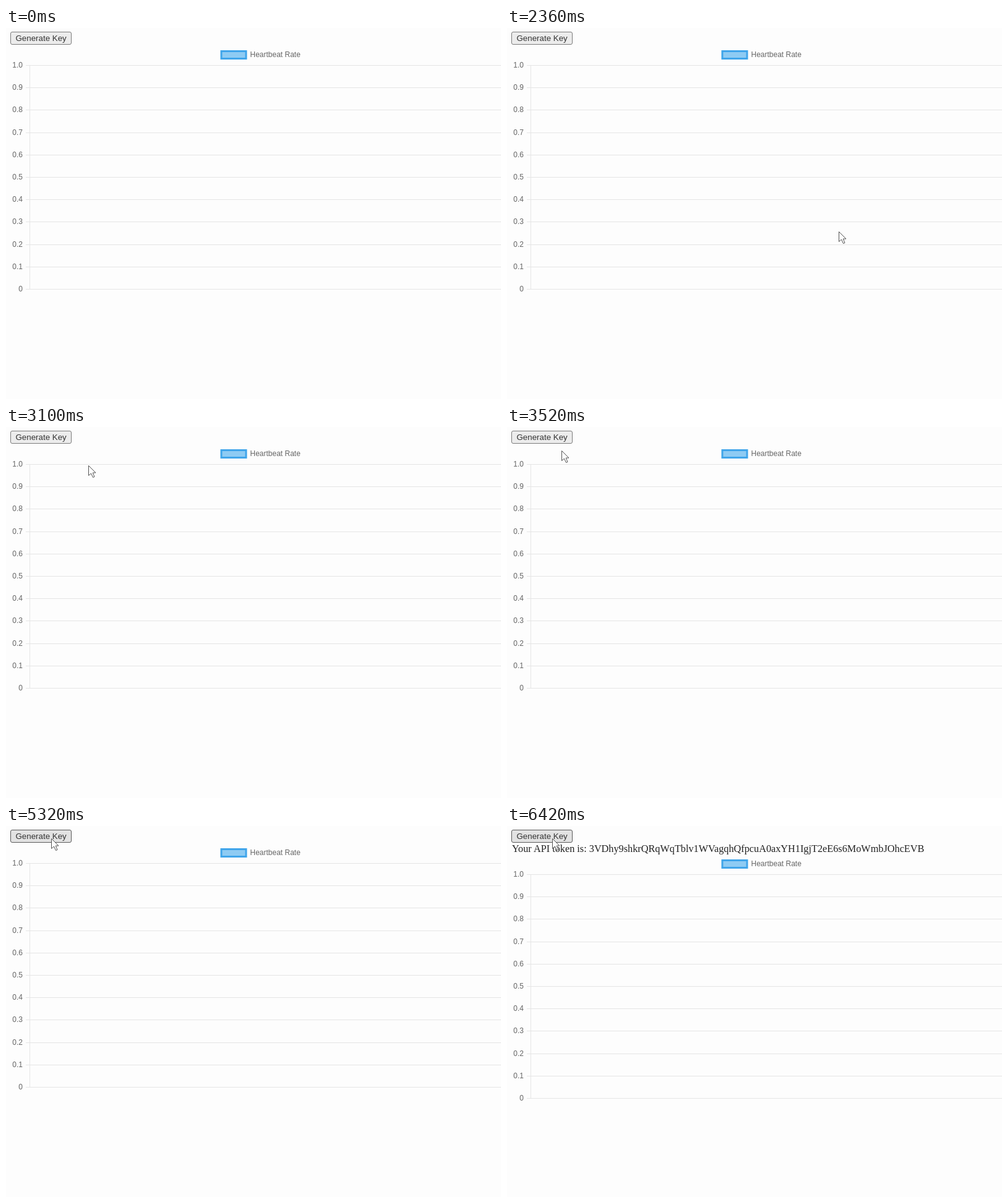
Recreate the animation shown at these times as an HTML page. Size 800 px wide and 600 px high, loop 8 s.

```html
<!DOCTYPE html>
<html lang="en">
<head>
<meta charset="utf-8">
<title>Heartbeat chart</title>
<style>
  html, body { margin: 0; width: 100%; height: 100%; overflow: hidden; background: #fdfdfd; }
  svg { display: block; width: 800px; height: 600px; }
  text { font: 12px "Liberation Sans", Arial, sans-serif; fill: #666; }
  #button text { font-size: 13.333px; fill: #333; }
  #token { font: 16.25px "Liberation Serif", Times, serif; fill: #222; }
  #grid path { fill: none; stroke: #e5e5e5; }
</style>
</head>
<body>
<svg viewBox="0 0 800 600">
  <g id="button">
    <rect id="face" x="7.5" y="6.5" width="98" height="20" rx="2.5"/>
    <text x="15.5" y="21">Generate Key</text>
  </g>
  <text id="token" x="8" y="42">Your API token is: 3VDhy9shkrQRqWqTblv1WVagqhQfpcuA0axYH1IgjT2eE6s6MoWmbJOhcEVB</text>
  <g id="chart">
    <rect x="348" y="37.5" width="40" height="12" fill="#8ecbf3" stroke="#40a5ea" stroke-width="3"/>
    <text x="394.5" y="46.5">Heartbeat Rate</text>
    <g id="grid"><path d="M38.5 60V422"/></g>
  </g>
  <path id="cursor" d="M0 0V16L4 12.5L7 19L9.5 18L6.8 11.5H11.5Z" fill="#fdfdfd" stroke="#555"/>
</svg>
<script>
const LOOP = 8000, STEP = 40;
const CURSOR_IN = 1940, PRESS = 5620, RELEASE = 5860, TOKEN_SHOWN = 6180;
const linear = p => p;
const easeOut = p => 1 - (1 - p) ** 2;
const moves = [
  { start: 1940, end: 2680, from: [789, 496], to: [321, 187], ease: linear },
  { start: 2780, end: 3520, from: [228, 112], to: [88, 38], ease: easeOut },
  { start: 3660, end: 4080, from: [88, 38], to: [73, 20], ease: linear }
];
const faces = {
  idle: ["#ececec", "#7c7c7c"],
  hover: ["#e2e2e2", "#5a5a5a"],
  pressed: ["#f5f5f5", "#8d8d8d"]
};
const byId = id => document.getElementById(id);
const [face, token, chart, grid, cursor] =
  ["face", "token", "chart", "grid", "cursor"].map(byId);

function add(parent, tag, attributes, content = "") {
  const node = document.createElementNS(parent.namespaceURI, tag);
  for (const name in attributes) node.setAttribute(name, attributes[name]);
  node.textContent = content;
  parent.append(node);
}

for (let i = 0; i <= 10; i++) {
  const y = Math.round(60 + i * 36.2);
  add(grid, "path", { d: `M32 ${y + 0.5}H800` });
  add(grid, "text", { x: 27, y: y + 3.5, "text-anchor": "end" },
    i === 10 ? "0" : (1 - i / 10).toFixed(1));
}

function cursorAt(time) {
  const move = moves.findLast(m => time >= m.start) || moves[0];
  const elapsed = Math.floor((time - move.start) / STEP) * STEP;
  const done = time >= move.end ? 1 : Math.max(0, elapsed / (move.end - move.start));
  return move.from.map((a, i) => Math.round(a + (move.to[i] - a) * move.ease(done)));
}

function draw(time) {
  const [x, y] = cursorAt(time);
  const hovering = x > 7 && x < 106 && y > 6 && y < 27;
  const state = time >= PRESS && time < RELEASE ? "pressed" : hovering ? "hover" : "idle";
  const [fill, stroke] = faces[state];
  face.setAttribute("fill", fill);
  face.setAttribute("stroke", stroke);
  cursor.setAttribute("transform", `translate(${x + 0.5} ${y + 0.5})`);
  cursor.style.visibility = time < CURSOR_IN ? "hidden" : "visible";
  const shown = time >= TOKEN_SHOWN;
  token.style.visibility = shown ? "visible" : "hidden";
  chart.setAttribute("transform", `translate(0 ${shown ? 18 : 0})`);
}

const started = performance.now();
function tick() {
  draw((performance.now() - started) % LOOP);
  requestAnimationFrame(tick);
}
tick();
</script>
</body>
</html>
```
